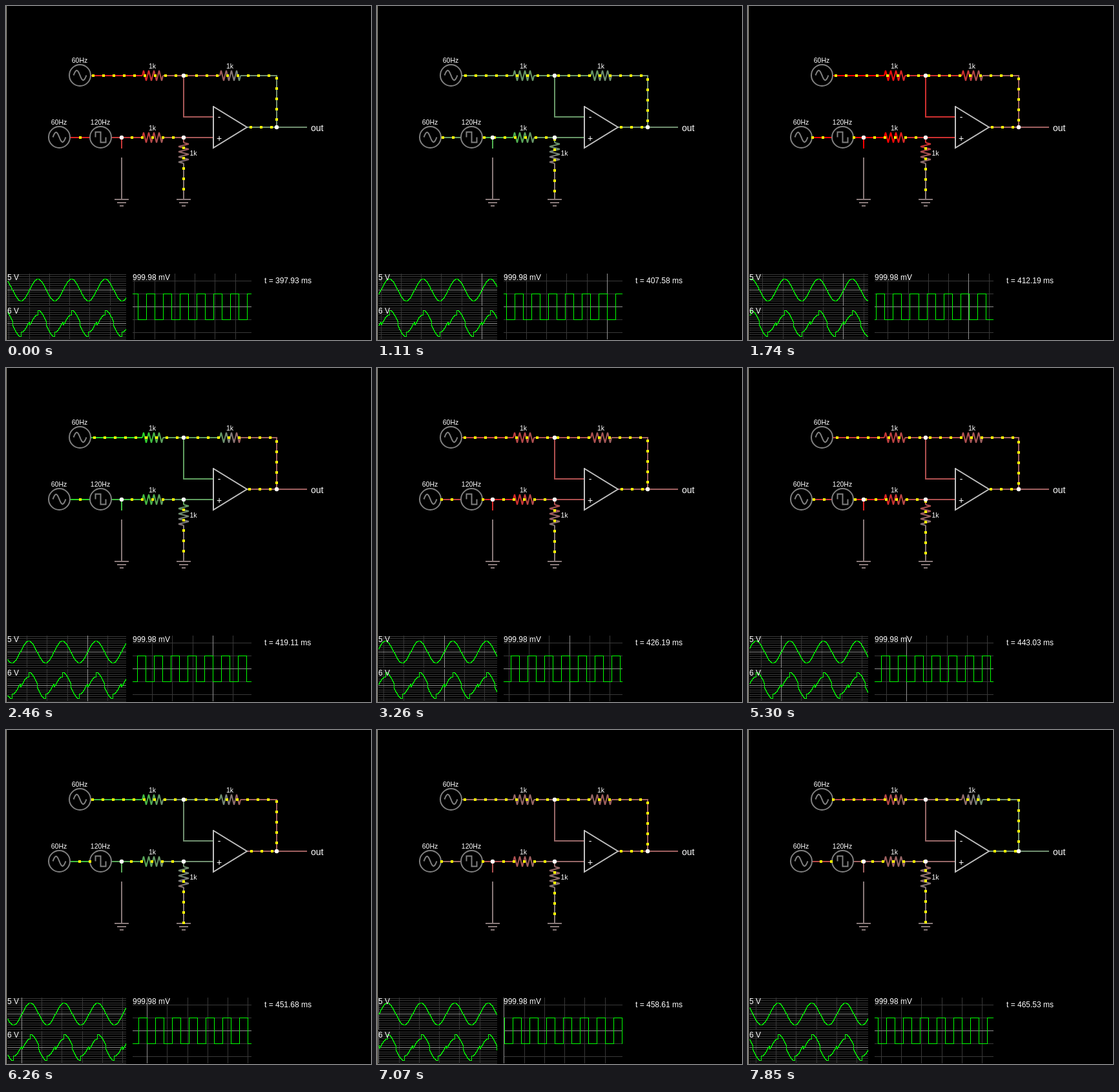
An HTML page with a canvas that plays this animation: 565 by 518 pixels, repeating every 8000 ms.

```html
<!DOCTYPE html>
<html lang="en">
<head>
<meta charset="utf-8">
<title>Difference amplifier</title>
<style>
html, body { margin: 0; width: 100%; height: 100%; overflow: hidden; background: #000; }
canvas { display: block; }
</style>
</head>
<body>
<canvas id="stage" width="565" height="518"></canvas>
<script>
const g = document.getElementById('stage').getContext('2d');
const LOOP = 8000;
const REPAINT = 130;
const MS_PER_PX = 0.32;
const GRAY = '#808080';
const FONT = '"Liberation Sans", Arial, sans-serif';

// Key points: wall time, simulated ms, dot offset of the upper and the lower branch.
const keys = [
  { wall: 0, t: 397.93, upper: 4, lower: 0 },
  { wall: 1110, t: 407.58, upper: 5.5, lower: 2.5 },
  { wall: 2460, t: 419.11, upper: 6, lower: 0 },
  { wall: 3260, t: 426.19, upper: 4.5, lower: 0.7 },
  { wall: 4470, t: 436.55, upper: 7, lower: 2.5 },
  { wall: 6260, t: 451.68, upper: 3.2, lower: -1.5 },
  { wall: 7850, t: 465.53, upper: 1, lower: -2 }
];

const frac = x => x - Math.floor(x);
const sine = t => 5 * Math.sin(2 * Math.PI * 0.06 * t);
const square = t => frac(0.12 * t) < 0.5 ? -1 : 1;
const sum = t => sine(t) + square(t);
// Charge moved by the sine current, in pixels of dot travel.
const sway = t => -1.4 * Math.cos(2 * Math.PI * 0.06 * t);

// Each stretch between key points is repainted in equal steps of about REPAINT ms.
function stateAt(wall) {
  let i = 0;
  while (i < keys.length - 1 && wall >= keys[i + 1].wall) i++;
  const a = keys[i], b = keys[i + 1];
  if (!b) return a;
  const span = b.wall - a.wall;
  const steps = Math.round(span / REPAINT);
  const k = Math.floor((wall - a.wall) / span * steps) / steps;
  const mix = (p, q) => p + (q - p) * k;
  const t = mix(a.t, b.t);
  const offset = n => sway(t) + mix(a[n] - sway(a.t), b[n] - sway(b.t));
  return { t, upper: offset('upper'), lower: offset('lower') };
}

// Red below zero, green above, in 32 steps.
function voltColor(v) {
  const step = Math.max(0, Math.min(31, Math.floor((v + 5) * 3.1)));
  const s = step / 16 - 1;
  const hi = Math.round(128 * Math.abs(s) + 127);
  const lo = Math.round(128 * (1 - Math.abs(s)));
  return s < 0 ? `rgb(${hi},${lo},${lo})` : `rgb(${lo},${hi},${lo})`;
}

function line(color, ...p) {
  g.strokeStyle = color;
  g.lineWidth = 2;
  g.beginPath();
  g.moveTo(p[0], p[1]);
  for (let i = 2; i < p.length; i += 2) g.lineTo(p[i], p[i + 1]);
  g.stroke();
}

function text(s, x, y, size, align = 'left') {
  g.fillStyle = '#fff';
  g.font = `${size}px ${FONT}`;
  g.textAlign = align;
  g.fillText(s, x, y);
}

function label(s, x, y) {
  text(s, x, y, 10.5, 'center');
}

function resistor(x, y, v1, v2, vertical) {
  const side = i => 8 * Math.round(Math.sin(i * Math.PI / 2));
  for (let i = 0; i < 16; i++) {
    const c = voltColor(v1 + (v2 - v1) * i / 16);
    const a = side(i), b = side(i + 1), p = i * 2, q = p + 2;
    if (vertical) line(c, x + a, y + p, x + b, y + q);
    else line(c, x + p, y - a, x + q, y - b);
  }
}

function source(x, y, name, isSquare) {
  g.strokeStyle = GRAY;
  g.lineWidth = 2;
  g.beginPath();
  g.arc(x, y, 16.5, 0, 2 * Math.PI);
  g.stroke();
  const p = [];
  if (isSquare) {
    p.push(x - 8, y, x - 8, y - 8, x, y - 8, x, y + 8, x + 8, y + 8, x + 8, y);
  } else {
    for (let i = -10; i <= 10; i++) p.push(x + i, y + 7.6 * Math.sin(i * Math.PI / 10));
  }
  line(GRAY, ...p);
  label(name, x - 0.5, y - 19.5);
}

function ground(x, y, color) {
  for (let i = 0; i < 3; i++) {
    const half = 11 - i * 4;
    line(color, x - half, y + i * 5, x + half, y + i * 5);
  }
}

// Calls put(pos) for every dot, 16 px apart, that lies between from and to.
function eachDot(origin, from, to, put) {
  const first = from + 16 * frac((origin - from) / 16);
  for (let p = first; p <= to; p += 16) put(p);
}

function dot(x, y) {
  g.fillStyle = '#ff0';
  g.fillRect(Math.round(x) - 2, Math.round(y) - 2, 4, 4);
}

function post(x, y) {
  g.fillStyle = '#fff';
  g.beginPath();
  g.arc(x, y, 3.2, 0, 2 * Math.PI);
  g.fill();
}

function circuit({ t, upper, lower }) {
  const v1 = sine(t), out = square(t), node = v1 + out, mid = node / 2;
  const cIn = voltColor(v1), cNode = voltColor(node), cMid = voltColor(mid);
  const cOut = voltColor(out), cGnd = voltColor(0);

  line(cIn, 132, 108, 211, 108);
  line(cMid, 243, 108, 331, 108);
  line(cMid, 275, 108, 275, 172, 321, 172);
  line(cOut, 363, 108, 419, 108, 419, 188);
  line(cOut, 373, 188, 466, 188);
  line(cIn, 99, 204, 130, 204);
  line(cNode, 163, 204, 211, 204);
  line(cNode, 179, 204, 179, 221);
  line(cMid, 243, 204, 321, 204);
  line(cMid, 275, 204, 275, 212);
  line(cGnd, 275, 244, 275, 300);
  line(cGnd, 179, 235, 179, 300);
  ground(179, 300, cGnd);
  ground(275, 300, cGnd);

  resistor(211, 108, v1, mid);
  resistor(331, 108, mid, out);
  resistor(211, 204, node, mid);
  resistor(275, 212, mid, 0, true);

  source(114.5, 107.5, '60Hz');
  source(82.5, 203.5, '60Hz');
  source(146.5, 203.5, '120Hz', true);

  line('#c0c0c0', 321, 156, 373, 188, 321, 220, 321, 155);
  text('-', 330, 177, 14, 'center');
  text('+', 330, 210, 14, 'center');

  eachDot(131 + upper, 131.5, 418, x => dot(x, 108));
  eachDot(108 + upper, 108, 187, y => dot(419, y));
  eachDot(415 - upper, 374, 418, x => dot(x, 188));
  eachDot(115 + lower, 99.4, 130, x => dot(x, 204));
  eachDot(163 + lower, 163.5, 275, x => dot(x, 204));
  eachDot(204 + lower, 206, 299, y => dot(275, y));

  post(275, 108);
  post(179, 204);
  post(275, 204);
  post(419, 188);

  label('1k', 226.5, 97);
  label('1k', 346.5, 97);
  label('1k', 226.5, 193);
  label('1k', 290, 232);
  text('out', 472, 194, 14);
}

function scope(t, x, y, h, mid, pxPerVolt, signal) {
  const w = 184, right = x + w;
  const minor = '#383838', major = '#909090';
  const rule = (color, ...box) => { g.fillStyle = color; g.fillRect(...box); };
  const yOf = v => mid - Math.trunc(pxPerVolt * v);

  for (let v = 1; v * pxPerVolt < h / 2; v++) {
    rule(minor, x, yOf(v), w, 1);
    rule(minor, x, yOf(-v), w, 1);
  }
  // A vertical line every 10 ms, a bright one every 100 ms.
  for (let n = Math.floor(t / 10); ; n--) {
    const gx = Math.floor(right - (t - n * 10) / MS_PER_PX);
    if (gx < x) break;
    rule(n % 10 ? minor : major, gx, y, 1, h);
  }
  rule(major, x, mid, w, 1);

  const level = px => yOf(signal(t - (right - px - 0.77) * MS_PER_PX));
  let prev = level(x);
  for (let px = x; px < right; px++) {
    const cur = level(px);
    rule('#0f0', px, Math.min(prev, cur), 1, Math.abs(cur - prev) + 1);
    prev = cur;
  }
}

function draw(wall) {
  const state = stateAt(wall), t = state.t;
  g.fillStyle = '#000';
  g.fillRect(0, 0, 565, 518);
  g.fillStyle = '#aca899';
  g.fillRect(0, 0, 1, 518);
  circuit(state);
  scope(t, 2, 415, 50, 440, 3.5, sine);
  scope(t, 2, 467, 50, 492, 3.5, sum);
  scope(t, 196, 415, 102, 466, 20.3, square);
  text('5 V', 2, 425, 12);
  text('6 V', 2, 477, 12);
  text('999.98 mV', 196, 425, 12);
  text(`t = ${t.toFixed(2)} ms`, 400, 430, 12);
}

const start = performance.now();
function loop() {
  draw((performance.now() - start) % LOOP);
  requestAnimationFrame(loop);
}
loop();
</script>
</body>
</html>
```
